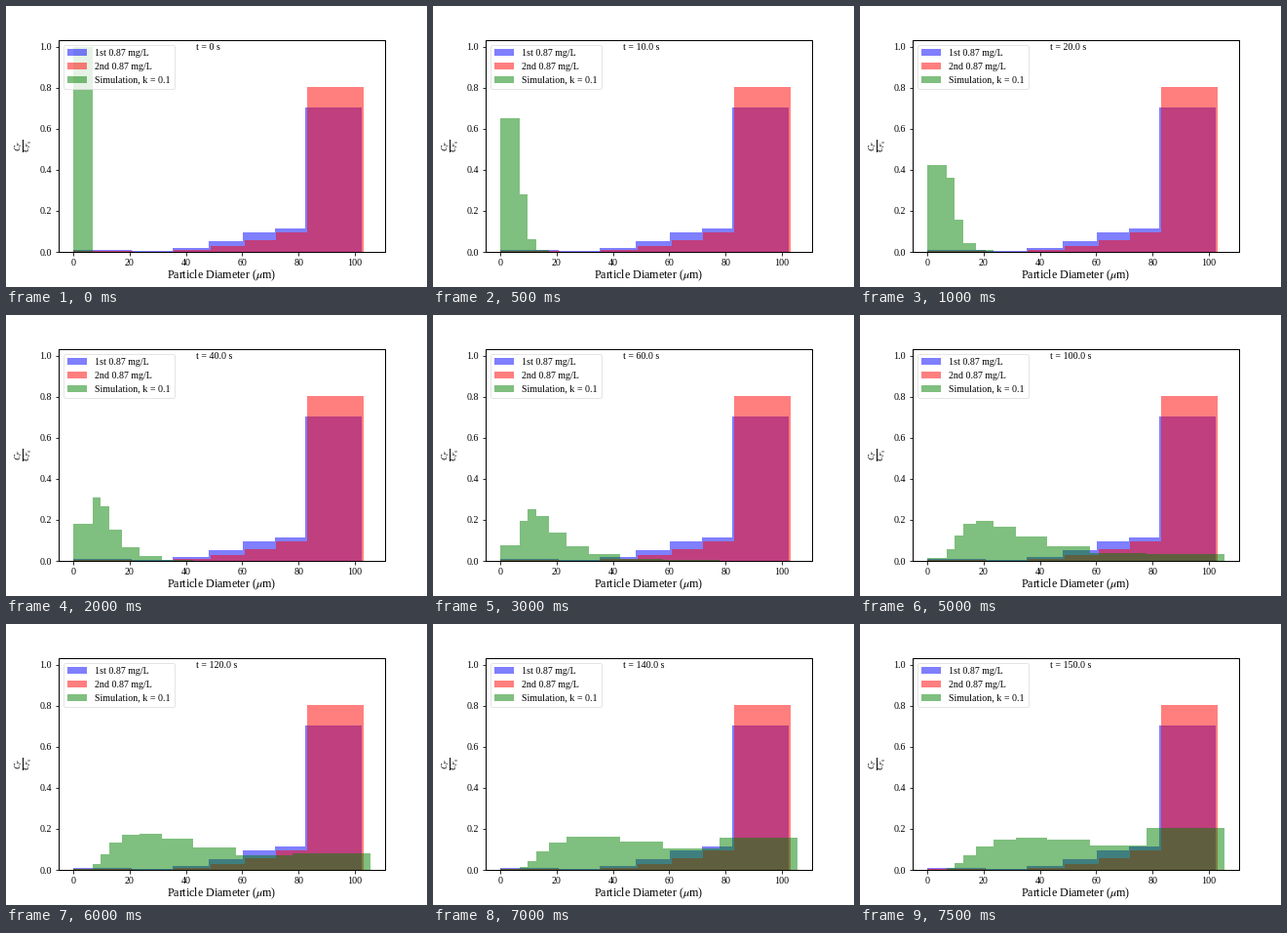
These frames come from a looping animation (432x288 px, 8 s). A matplotlib script:

```python
import math

import matplotlib.pyplot as plt
import numpy as np
from matplotlib.animation import FuncAnimation

plt.rcParams.update({
    "font.family": "Liberation Serif",
    "mathtext.fontset": "stix",
    "text.kerning_factor": 6,
    "font.size": 10,
    "axes.labelsize": 12,
    "axes.linewidth": 1,
})

FRAMES, STEP_MS = 16, 500
SECONDS_PER_FRAME = 10
RATE = 0.043  # growth events per second
BINS = 10


def simulated(t):
    """Poisson shares over the bins; the last bin collects the rest."""
    lam = RATE * t
    p = [math.exp(-lam) * lam**n / math.factorial(n) for n in range(BINS - 1)]
    return p + [max(0.0, 1 - sum(p))]


def measured(scale, power, fines, curve):
    """Power-law bin edges, with the largest size class holding the rest."""
    edges = scale * np.append(np.arange(7), 8) ** power
    shares = curve(np.arange(7))
    shares[0] = fines
    shares[-1] = 1 - shares[:-1].sum()
    return edges, shares


def histogram(ax, edges, heights, color, label):
    return ax.bar(edges[:-1], heights, np.diff(edges), align="edge",
                  color=color, alpha=0.5, label=label)


fig, ax = plt.subplots(figsize=(6, 4), dpi=72)
fig.subplots_adjust(left=0.125, right=0.9, bottom=0.125, top=0.88)

first = measured(20.72, 0.7695, 0.009,
                 lambda n: 0.115 * np.exp(-0.2 * (n - 5) ** 2))
second = measured(21.055, 0.765, 0.0035,
                  lambda n: 0.0955 * (n / 5) ** 2.4)
# Each growth step doubles the mass of a particle with fractal dimension 2.3
sim_edges = np.append(0, 7 * 2 ** (np.arange(BINS) / 2.3))

histogram(ax, *first, "b", "1st 0.87 mg/L")
histogram(ax, *second, "r", "2nd 0.87 mg/L")
sim = histogram(ax, sim_edges, simulated(0), "g", "Simulation, k = 0.1")

margin = 0.05 * sim_edges[-1]
ax.set_xlim(-margin, sim_edges[-1] + margin)
ax.set_ylim(0, 1.035)
ax.set_xticks(range(0, 101, 20))
ax.set_yticks(np.linspace(0, 1, 6))
ax.set_xlabel(r"Particle Diameter ($\mu$m)", labelpad=1)
ax.set_ylabel(r"$\frac{C_P}{C_{P_0}}$")
ax.legend(loc="upper left", edgecolor="0.87")
clock = ax.text(0.42, 0.95, "", transform=ax.transAxes)


def update(i):
    t = i * SECONDS_PER_FRAME
    for bar, height in zip(sim, simulated(t)):
        bar.set_height(height)
    clock.set_text(f"t = {t:.1f} s" if i else "t = 0 s")
    return [*sim, clock]


anim = FuncAnimation(fig, update, frames=FRAMES, interval=STEP_MS,
                     repeat=True, repeat_delay=0, blit=False)
plt.show()
```
